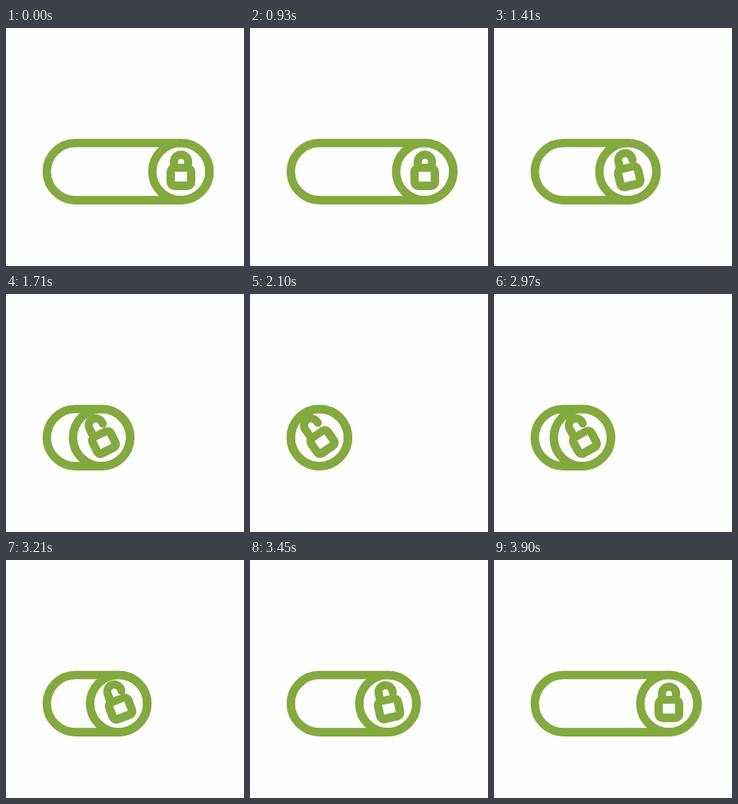
Animation of 298x298 px, one loop 4.23 s. Source, as an HTML page with a canvas:

```html
<!DOCTYPE html>
<html lang="en">
<head>
<meta charset="utf-8">
<title>Lock toggle</title>
<style>
  html, body { margin: 0; width: 100%; height: 100%; overflow: hidden; background: #fefefe; }
  canvas { display: block; width: 298px; height: 298px; }
</style>
</head>
<body>
<canvas id="stage"></canvas>
<script>
const SIZE = 298, LOOP = 4230, STEP = 30, MOVE = 1200;
const LEFT = 86.9, RIGHT = 219, MID_Y = 179.8, RADIUS = 35.8;
const TILT = -35 * Math.PI / 180, LIFT = 6;
const GREEN = '#82aa3e', PAPER = '#fefefe';

const canvas = document.getElementById('stage');
const ctx = canvas.getContext('2d');
const ratio = window.devicePixelRatio || 1;
canvas.width = canvas.height = Math.round(SIZE * ratio);

// Symmetric cubic bezier ease (a, 0, 1 - a, 1), solved by bisection.
function ease(x, a) {
  if (x <= 0) return 0;
  if (x >= 1) return 1;
  let lo = 0, hi = 1, s = 0.5;
  for (let i = 0; i < 24; i++) {
    s = (lo + hi) / 2;
    const r = 1 - s;
    const bx = 3 * r * r * s * a + 3 * r * s * s * (1 - a) + s * s * s;
    if (bx < x) lo = s; else hi = s;
  }
  return s * s * (3 - 2 * s);
}

// 0 = locked on the right, 1 = unlocked on the left
function openness(ms) {
  const t = Math.floor(ms % LOOP / STEP) * STEP;
  return ease((t - 900) / MOVE, 1 / 3) - ease((t - 2700) / MOVE, 1 / 6);
}

function drawPill(x) {
  ctx.lineWidth = 10.6;
  ctx.beginPath();
  ctx.arc(LEFT, MID_Y, RADIUS, Math.PI / 2, Math.PI * 1.5);
  ctx.arc(x, MID_Y, RADIUS, -Math.PI / 2, Math.PI / 2);
  ctx.closePath();
  ctx.stroke();
  ctx.beginPath();
  ctx.arc(x, MID_Y, RADIUS, 0, Math.PI * 2);
  ctx.stroke();
}

function drawLock(x, open) {
  ctx.save();
  ctx.translate(x, MID_Y);
  ctx.rotate(TILT * open);

  const top = -12.4 - LIFT * open;
  ctx.lineWidth = 10.2;
  ctx.beginPath();
  ctx.moveTo(-8.6, -5);
  ctx.lineTo(-8.6, top);
  ctx.arc(0.2, top, 8.8, Math.PI, 0);
  ctx.lineTo(9, top + 2);
  ctx.stroke();

  ctx.fillStyle = GREEN;
  ctx.beginPath();
  ctx.roundRect(-18, -9.7, 36, 32.9, 10);
  ctx.fill();
  ctx.fillStyle = PAPER;
  ctx.fillRect(-7.5, 0.2, 15, 12.2);
  ctx.restore();
}

function draw(ms) {
  const open = openness(ms);
  const x = RIGHT + (LEFT - RIGHT) * open;
  ctx.setTransform(ratio, 0, 0, ratio, 0, 0);
  ctx.fillStyle = PAPER;
  ctx.fillRect(0, 0, SIZE, SIZE);
  ctx.strokeStyle = GREEN;
  ctx.lineCap = ctx.lineJoin = 'round';
  drawPill(x);
  drawLock(x, open);
}

const start = performance.now();
function tick() {
  draw(performance.now() - start);
  requestAnimationFrame(tick);
}
tick();
</script>
</body>
</html>
```
